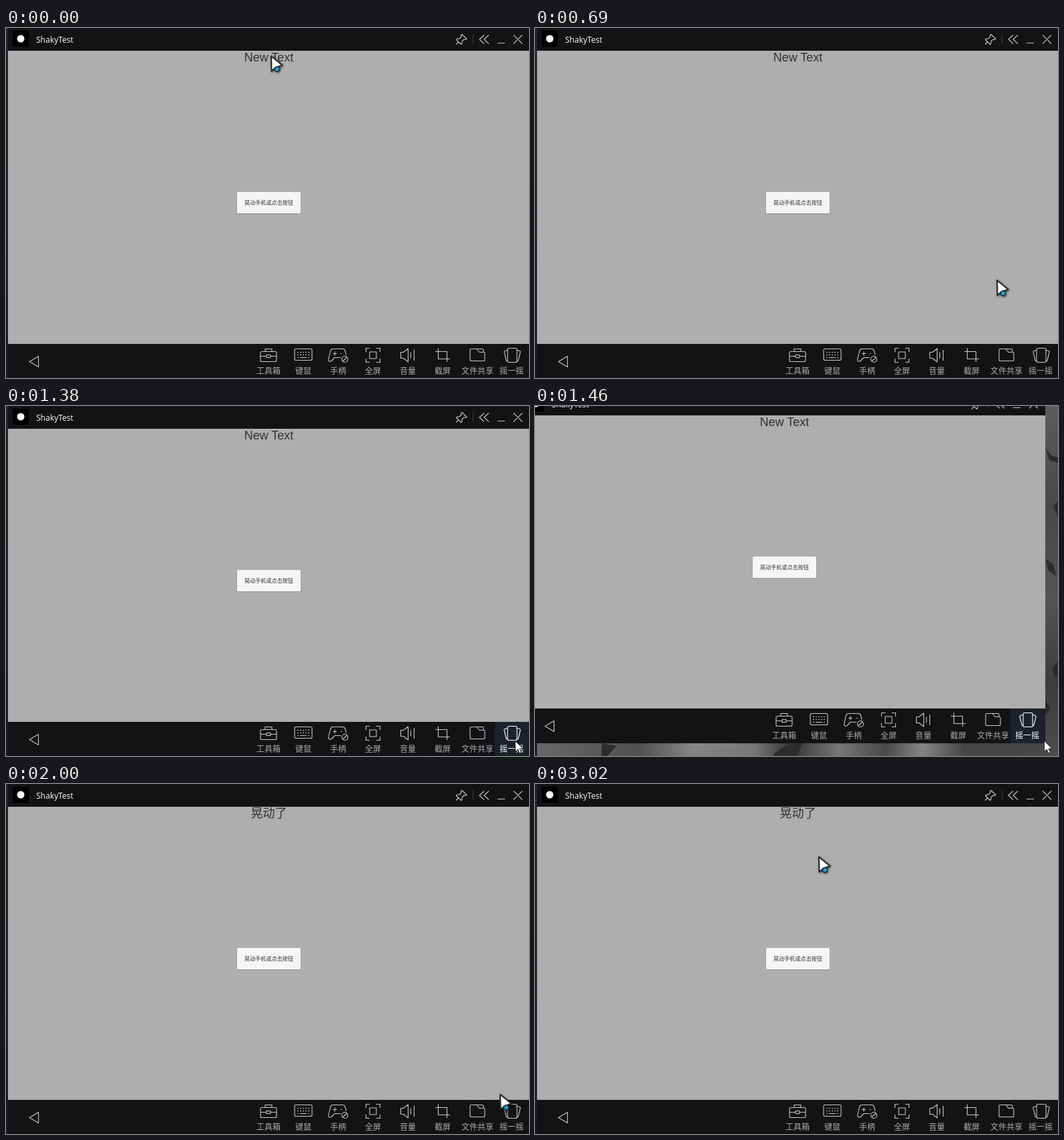
These frames come from a looping animation (781x523 px, 3.09 s). An HTML page:

```html
<!DOCTYPE html>
<html lang="zh-CN">
<head>
<meta charset="utf-8">
<title>ShakyTest</title>
<style>
  html, body { margin: 0; width: 100%; height: 100%; overflow: hidden; background: #121315; }
  svg { display: block; width: 781px; height: 523px; }
  text { font-family: "Noto Sans CJK SC", "Noto Sans CJK", sans-serif; text-anchor: middle; }
  .line { fill: none; stroke: #c6c7c9; stroke-width: 1.1; stroke-linejoin: round; }
  .tool text { font-size: 12px; fill: #acadaf; }
  .hot .line { stroke: #fff; }
  .hot text { fill: #fff; }
  #heading { font: 18px "Liberation Sans", "Noto Sans CJK SC", "Noto Sans CJK", sans-serif; fill: #323232; }
  #appName { font: 12px "Open Sans", sans-serif; text-anchor: start; fill: #fff; }
  #pointer { filter: drop-shadow(1px 1px 1.5px #0009); }
</style>
</head>
<body>
<svg viewBox="0 0 781 523">
  <defs>
    <linearGradient id="ground">
      <stop offset="0" stop-color="#686868"/>
      <stop offset=".2" stop-color="#505050"/>
      <stop offset=".3" stop-color="#858585"/>
      <stop offset=".42" stop-color="#777"/>
      <stop offset=".49" stop-color="#343434"/>
      <stop offset=".58" stop-color="#777"/>
      <stop offset=".67" stop-color="#494949"/>
      <stop offset=".74" stop-color="#858585"/>
      <stop offset=".82" stop-color="#464646"/>
      <stop offset="1" stop-color="#484848"/>
    </linearGradient>
    <linearGradient id="cliff" x2="0" y2="1">
      <stop offset="0" stop-color="#5c5c5c"/>
      <stop offset=".3" stop-color="#484848"/>
      <stop offset=".55" stop-color="#555"/>
      <stop offset=".8" stop-color="#3c3c3c"/>
      <stop offset="1" stop-color="#4c4c4c"/>
    </linearGradient>
    <linearGradient id="edge" x2="0" y2="1">
      <stop offset="0" stop-color="#22262d"/>
      <stop offset=".5" stop-color="#20262f"/>
      <stop offset="1" stop-color="#151b25"/>
    </linearGradient>
  </defs>

  <rect width="781" height="523" fill="url(#ground)"/>
  <rect x="755" width="26" height="523" fill="url(#cliff)"/>
  <path fill="#2c2c2c" d="M762 62l9 12 10 3v8l-13-4zM774 150l7-8v24zM762 228l12 8 4 18-12-9zM781 382l-9 10 4 14 5-2zM762 440l8 12-8 10zM100 504l22 4-14 15h-9zM355 523q14-18 44-19l-8 19z"/>
  <rect width="3" height="523" fill="url(#edge)"/>

  <g id="window">
    <rect x="3" width="779" height="524" fill="#121315"/>
    <rect x="3" y="34" width="779" height="438" fill="#aeaeae"/>
    <rect x="10" y="4" width="24" height="24" fill="#000"/>
    <circle cx="22" cy="16" r="5.5" fill="#fff"/>
    <text id="appName" x="45" y="22">ShakyTest</text>
    <path class="line" d="M681 9.5l7 7-2 1-2-.5-3 3 0 3-1.5 1.5-7-7 1.5-1.5 3 0 3-3-.5-2zM676 20.500l-4 4M714 10.500l-7 6.500 7 6.500M721 10.500l-7 6.500 7 6.500M734 22.500h11M758 10.500l13 13M771 10.500l-13 13"/>
    <path stroke="#3c3d40" d="M697.500 9v15"/>

    <text id="heading" x="392.500" y="50"></text>
    <rect x="344.500" y="245" width="96" height="33" rx="2" fill="#8f8f8f"/>
    <rect x="345" y="245" width="95" height="32" rx="1.500" fill="#f5f5f5"/>
    <text x="392.500" y="264" font-size="8.100" fill="#323232">晃动手机或点击按钮</text>

    <path class="line" d="M35 498.500l13.500-8v16z"/>
    <rect id="hover" x="730" y="472" width="52" height="52" fill="#1c212c"/>
    <g id="tools"></g>
  </g>

  <g id="pointer">
    <path d="M2 2L2.500 24.500 8 19.500 18.500 15.500z" fill="#fff" stroke="#2b2b2f" stroke-width="2.200" stroke-linejoin="round"/>
    <circle cx="11" cy="21.500" r="3.700" fill="#1a9bd0" stroke="#26282c" stroke-width="1.500"/>
  </g>
  <path id="arrow" d="M.5 .5v16l3.800-3.600 2.600 6 2.500-1-2.600-5.900h5.200z" fill="#fff" stroke="#111" stroke-width=".8"/>
  <circle id="click" r="12" fill="#ff0" fill-opacity=".47"/>
</svg>
<script>
const LOOP = 3090;
const $ = id => document.getElementById(id);

// Label, centre x, icon drawn around (0, 0)
const tools = [
  ['工具箱', 392, 'M-10-5.500h20q2 0 2 2v11q0 2-2 2h-20q-2 0-2-2v-11q0-2 2-2zM-5-5.500v-4h10v4M-12 1.500h9M3 1.500h9M-3-.5h6v4h-6z'],
  ['键鼠', 444, 'M-11-9.500h22q2 0 2 2v13q0 2-2 2h-22q-2 0-2-2v-13q0-2 2-2zM-9-4.500h2m2 0h2m2 0h2m2 0h2m2 0h2M-9-.5h2m2 0h2m2 0h2m2 0h2m2 0h2M-9 3.500h2m2 0h10m2 0h2'],
  ['手柄', 496, 'M4 3.500h-9l-5 5q-4 2-4.500-2l3-13q1-3 4-3h14q3 0 4 3l1.500 6M-8-2.500h6M-5-5.500v6M3.500-2.500h2M14.500 6a4.500 4.500 0 1 1-9 0a4.500 4.500 0 1 1 9 0M7 9l6-6'],
  ['全屏', 548, 'M-10.500-5v-5.500h5.500M5-10.500h5.500v5.500M10.500 5v5.500h-5.500M-5 10.500h-5.500v-5.500M-5-5h10v10h-10z'],
  ['音量', 600, 'M-10.500-4.500h4l7-5.500v20l-7-5.500h-4zM4.500-4.500v9M9.500-8v16'],
  ['截屏', 652, 'M-11-5.500h17.500v15.500M-6.500-10.500v16h17.500'],
  ['文件共享', 704, 'M-9-9.500h8l4 5h6q2 0 2 2v9q0 2-2 2h-18q-2 0-2-2v-14q0-2 2-2zM-1-9.500h8q2 0 2 2v3'],
  ['摇一摇', 755, 'M-4-10.500h10q2 0 2 2v17q0 2-2 2h-10q-2 0-2-2v-17q0-2 2-2zM-6-7.500l-4 1q-1.500.5-1 2l3 12q.5 1.500 2 1M8-7.500l4 1q1.500.5 1 2l-3 12q-.5 1.500-2 1']
];
$('tools').innerHTML = tools.map(([label, x, icon]) =>
  `<g class="tool"><path class="line" transform="translate(${x} 489)" d="${icon}"/>` +
  `<text x="${x}" y="517">${label}</text></g>`).join('');
const shakeTool = $('tools').lastChild;

// Stepped tracks: [start time, x, y]
const pointerTrack = [
  [0, 394, 40], [550, 474, 132], [620, 590, 264], [690, 688, 375],
  [770, 726, 430], [850, 746, 464], [920, 754, 484], [1000, 758, 495], [1070, 760, 500],
  [2000, 736, 462], [2080, 642, 348], [2150, 542, 226], [2230, 462, 130],
  [2310, 416, 77], [2380, 402, 60], [2470, 398, 57], [2550, 397, 52], [2630, 396, 48],
  [3020, 422, 107]
];
const shakeTrack = [[0, 0, 0], [1460, -20, -20], [1540, 0, -20], [1610, -20, 0], [1690, 0, 0]];
const clicks = [[230, 400], [1240, 1380], [2700, 2850]];

const at = (track, t) => track.findLast(key => key[0] <= t);
const place = (node, x, y) => node.setAttribute('transform', `translate(${x} ${y})`);
const show = (node, on) => node.setAttribute('visibility', on ? 'visible' : 'hidden');

function draw(now) {
  const t = now % LOOP;
  const [, x, y] = at(pointerTrack, t);
  const [, dx, dy] = at(shakeTrack, t);
  const overBar = y > 472;
  const hot = overBar && x > 730;

  place($('window'), dx, dy);
  place($('pointer'), x, y);
  place($('arrow'), x, y);
  place($('click'), x + 1, y + 1);
  show($('pointer'), !overBar);
  show($('arrow'), overBar);
  show($('hover'), hot);
  show($('click'), clicks.some(([from, to]) => t >= from && t < to));
  shakeTool.classList.toggle('hot', hot);
  $('heading').textContent = t < 1540 ? 'New Text' : '晃动了';
  requestAnimationFrame(draw);
}
requestAnimationFrame(draw);
</script>
</body>
</html>
```
